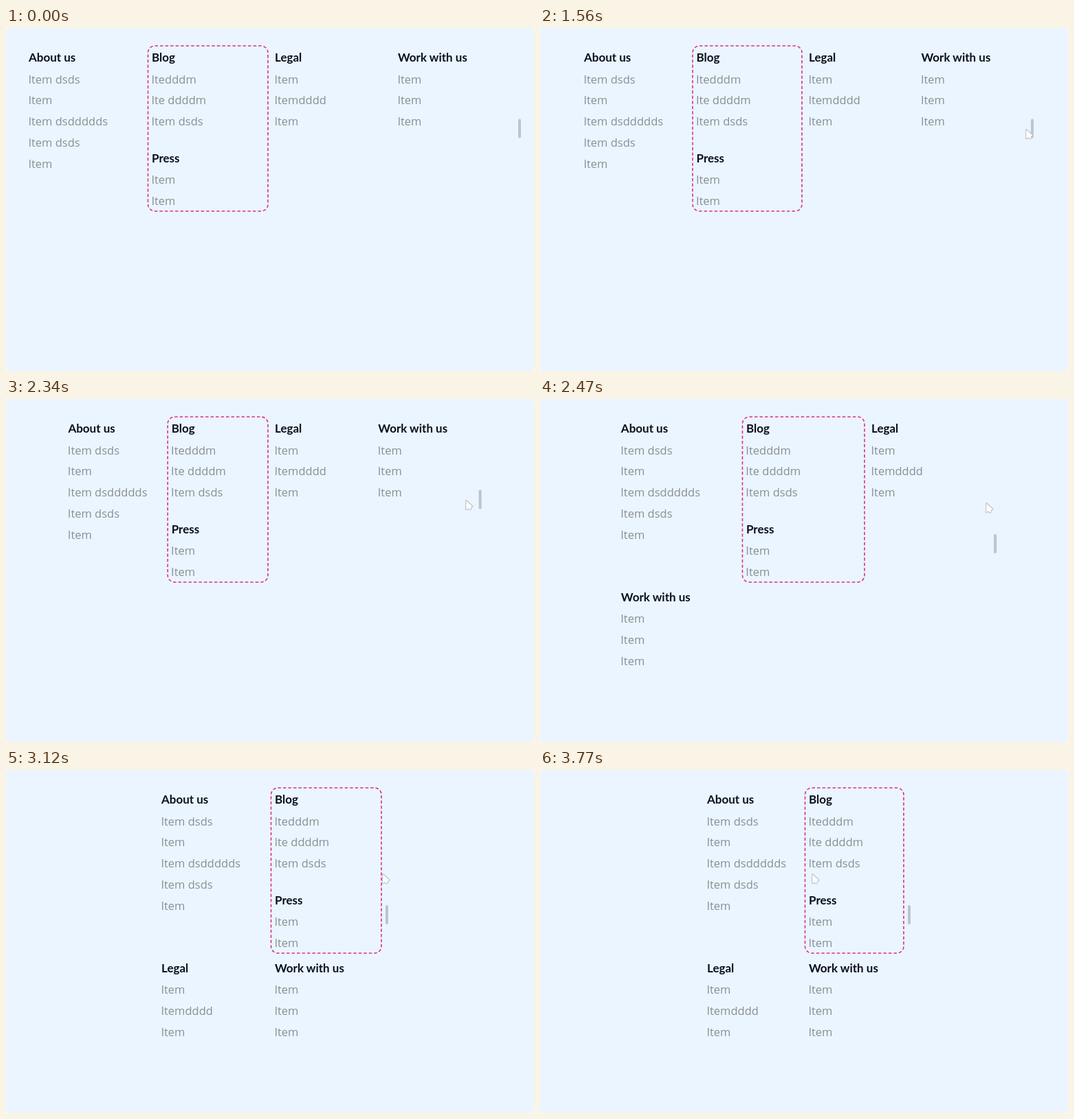
Animation of 768x500 px, one loop 4160 ms. Source, as an HTML page:

```html
<!DOCTYPE html>
<html lang="en">
<head>
<meta charset="utf-8">
<title>Responsive footer columns</title>
<style>
  html, body { margin: 0; width: 100%; height: 100%; overflow: hidden; background: #fafcfe; }
  svg { display: block; width: 768px; height: 500px; }
  text { font: 500 16.5px "Open Sans", sans-serif; fill: #8b8e92; }
  .head { font: 700 17px Lato, sans-serif; fill: #0b0f1a; }
</style>
</head>
<body>
<svg id="stage" viewBox="0 0 768 500">
  <rect width="768" height="500" rx="6" fill="#eaf5ff"/>
  <rect id="frame" y="26" height="241" rx="10" fill="none" stroke="#df2f84" stroke-width="1.6" stroke-dasharray="4.5 3"/>
  <rect id="handle" width="4" height="28" rx="2" fill="#bcc5ce"/>
  <path id="cursor" d="M.8 1.2Q1 .2 2 1L10.8 9Q11.6 10.2 10.2 10.6L8.6 11 8.4 14Q7 15.6 5 14.4L4.4 13 1.6 14.6Q.5 15 .5 13.8Z"
    fill="#fafbfc" stroke="#c3c0c2" stroke-width="1.1" stroke-linejoin="round"/>
</svg>
<script>
const LOOP = 4160, STEP = 130, CURSOR_IN = 1170;
const MID = 391, MIN_COL = 142, MAX_COLS = 4;
const TOP = 49, ROW = 30.75, SECTION = 146.5, WRAP = 245.5, DASH = 7.5;

const columns = [
  [["About us", "Item dsds", "Item", "Item dsddddds", "Item dsds", "Item"]],
  [["Blog", "Itedddm", "Ite ddddm", "Item dsds"], ["Press", "Item", "Item"]],
  [["Legal", "Item", "Itemdddd", "Item"]],
  [["Work with us", "Item", "Item", "Item"]]
];

// drags and rests: time, half width of the container, cursor x
const keys = [
  [0, 358, 743],
  [1300, 358, 743],
  [1560, 327, 706],
  [1820, 327, 706],
  [2080, 300.6, 668],
  [2340, 300.6, 668],
  [2730, 218.2, 608],
  [2860, 218.2, 608],
  [3120, 165, 547],
  [3510, 148, 525],
  [3770, 148, 395],
  [LOOP, 148, 395]
];

const stage = document.getElementById("stage");
const [box, handle, cursor] = ["frame", "handle", "cursor"].map(id => document.getElementById(id));

function set(el, attrs) {
  for (const key in attrs) el.setAttribute(key, attrs[key]);
}

function add(name, attrs, parent) {
  const el = document.createElementNS("http://www.w3.org/2000/svg", name);
  set(el, attrs);
  return parent.appendChild(el);
}

const groups = columns.map(sections => {
  const g = add("g", {}, stage);
  sections.forEach((lines, s) => lines.forEach((line, i) => {
    const y = TOP + s * SECTION + i * ROW;
    const attrs = i ? { x: -.6, y: y + .9 } : { y, class: "head" };
    add("text", attrs, g).textContent = line;
  }));
  return g;
});
stage.append(handle, cursor);

function pose(t) {
  const i = keys.findIndex(k => k[0] > t);
  const a = keys[i - 1], b = keys[i];
  const p = (t - a[0]) / (b[0] - a[0]);
  return [1, 2].map(n => a[n] + (b[n] - a[n]) * p);
}

function draw(time) {
  const t = Math.floor(time % LOOP / STEP) * STEP;
  const [half, cursorX] = pose(t);
  const count = Math.min(MAX_COLS, Math.floor(2 * half / MIN_COL));
  const wrapped = count < MAX_COLS;
  const pitch = 2 * half / count;
  const colX = i => MID - half + i * pitch;

  groups.forEach((g, i) => {
    set(g, { transform: `translate(${colX(i % count)} ${i < count ? 0 : WRAP})` });
  });
  set(box, { x: colX(1) - 5.5, width: pitch - 4.5 });
  // whole number of dashes around the frame
  set(box, { pathLength: DASH * Math.round(box.getTotalLength() / DASH) });
  set(handle, { x: MID + half - 4, y: wrapped ? 197 : 132.5 });
  set(cursor, {
    visibility: t < CURSOR_IN ? "hidden" : "visible",
    transform: `translate(${cursorX} ${wrapped ? 151 : 147})`
  });
}

function tick(now) {
  draw(now);
  requestAnimationFrame(tick);
}
draw(0);
requestAnimationFrame(tick);
</script>
</body>
</html>
```
